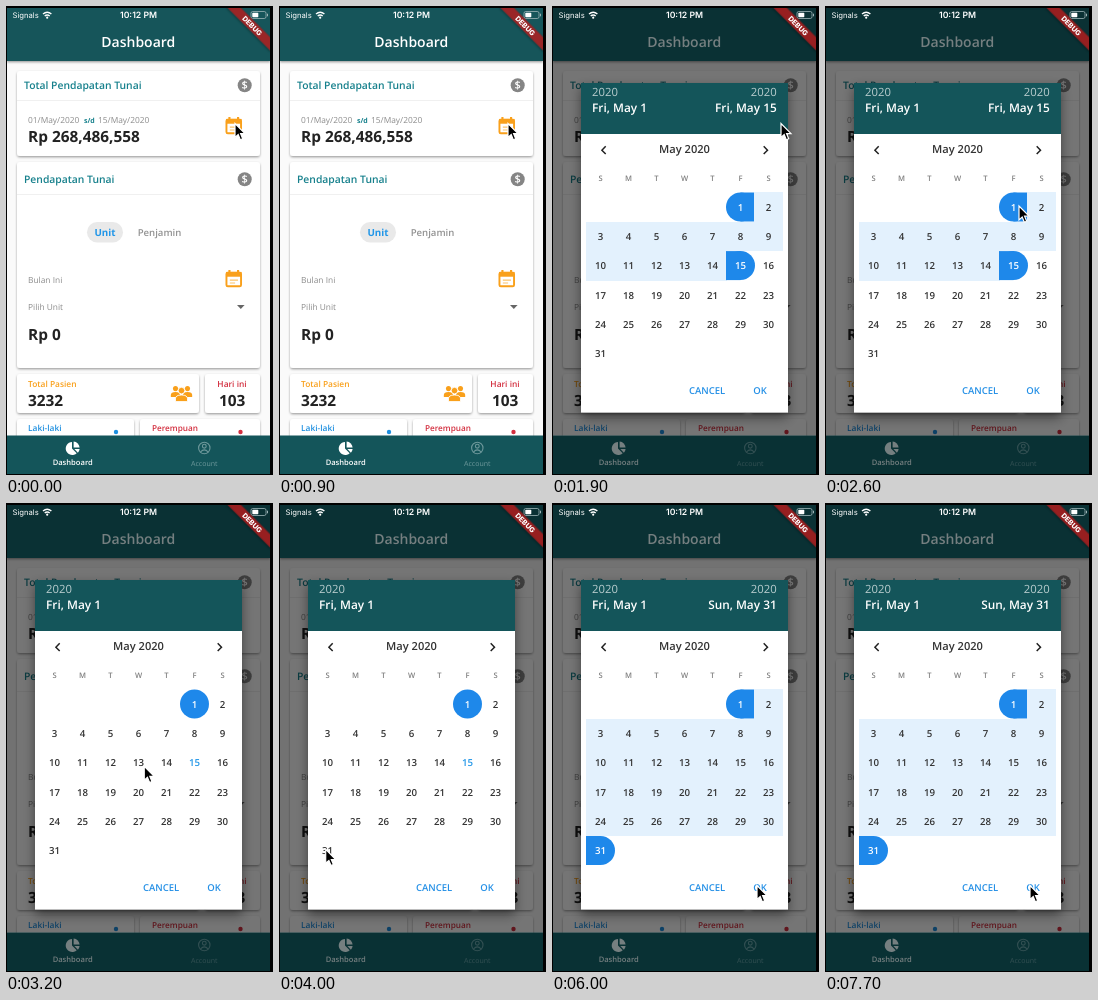
These frames come from a looping animation (267 px wide and 469 px high, 8 s). An HTML page:

```html
<!DOCTYPE html>
<html lang="id">
<head>
<meta charset="utf-8">
<title>Dashboard</title>
<style>
  html, body { margin: 0; width: 100%; height: 100%; overflow: hidden; background: #000; }
  svg { display: block; width: 100%; height: 100%; }
  text { font-family: "Open Sans", "Noto Sans", sans-serif; text-rendering: geometricPrecision; }
  .sys { font-family: Inter, Roboto, sans-serif; }
</style>
</head>
<body>
<svg id="stage" viewBox="0 0 267 469"></svg>
<script>
const LOOP = 8000, STEP = 100;
const TEAL = '#14555a', BLUE = '#1e88ea', ORANGE = '#f9a01b', RED = '#d32f3f';
const GRAY = '#8c8c8c', INK = '#222';

const text = (x, y, str, size, fill, weight = 400, anchor = 'start', extra = '') =>
  `<text x="${x}" y="${y}" font-size="${size}" fill="${fill}" font-weight="${weight}" text-anchor="${anchor}" ${extra}>${str}</text>`;
const rect = (x, y, w, h, fill, extra = '') =>
  `<rect x="${x}" y="${y}" width="${w}" height="${h}" fill="${fill}" ${extra}/>`;
const circle = (x, y, r, fill, extra = '') =>
  `<circle cx="${x}" cy="${y}" r="${r}" fill="${fill}" ${extra}/>`;
const path = (d, fill, extra = '') => `<path d="${d}" fill="${fill}" ${extra}/>`;
const line = (d, color, width) => path(d, 'none', `stroke="${color}" stroke-width="${width}"`);
const group = (attrs, ...parts) => `<g ${attrs}>${parts.join('')}</g>`;

const card = (x, y, w, h) => rect(x, y, w, h, '#fff', 'rx="3" filter="url(#soft)"');
const amount = (x, y, str) => text(x, y, str, 15.4, INK, 700);
const cardTitle = (y, str) =>
  text(18, y, str, 10.35, '#16808c', 600) + line(`M11 ${y + 11.5}H254`, '#f0f0f0', 1);
const coin = y => circle(238.7, y, 7, '#858585') + text(238.7, y + 4, '$', 11, '#fff', 600, 'middle');

const calendarIcon = y => group(`transform="translate(219.5 ${y}) scale(.96)"`,
  rect(1, 2.7, 15.2, 14.3, 'none', `rx="1.5" stroke="${ORANGE}" stroke-width="2"`),
  rect(0.5, 2, 16.2, 5, ORANGE),
  rect(3, 0, 2.2, 4, ORANGE), rect(12, 0, 2.2, 4, ORANGE),
  line('M4.5 10.5H13M4.5 13.5H10', '#fbc46b', 1.2));

const person = (x, y, s) => group(`transform="translate(${x} ${y}) scale(${s})"`,
  circle(0, -4, 3, ORANGE), path('M-5.5 6V3.5Q-5.5 0 0 0T5.5 3.5V6Z', ORANGE));
const people = person(169.5, 386, 0.85) + person(181.5, 386, 0.85) +
  group('stroke="#fff" stroke-width=".8"', person(175.5, 389, 1.1));

function dashboard() {
  return [
    rect(1, 2, 263, 466, '#fafafa'),
    card(11, 65, 243, 85), cardTitle(83, 'Total Pendapatan Tunai'), coin(79.3),
    text(22, 117, '01/May/2020', 8.4, GRAY),
    text(78, 116.5, 's/d', 7, '#16808c', 700),
    text(92, 117, '15/May/2020', 8.4, GRAY),
    amount(22, 136, 'Rp 268,486,558'), calendarIcon(111),

    card(11, 156, 243, 206), cardTitle(177, 'Pendapatan Tunai'), coin(173.3),
    rect(81, 216, 36, 20.5, '#e9e9e9', 'rx="10.2"'),
    text(99, 229.5, 'Unit', 9.8, '#2196e8', 700, 'middle'),
    text(153.5, 229.5, 'Penjamin', 9.6, '#929292', 600, 'middle'),
    text(22, 277, 'Bulan Ini', 8.4, GRAY), calendarIcon(264),
    text(22, 304, 'Pilih Unit', 8.4, GRAY),
    path('M231 299H238.6L234.8 303Z', '#666'),
    amount(22, 334, 'Rp 0'),

    card(11, 368, 182, 39), text(22, 381, 'Total Pasien', 8.4, ORANGE, 600),
    amount(22, 400, '3232'), people,
    card(199, 368, 55, 39), text(226, 381, 'Hari ini', 8.4, RED, 600, 'middle'),
    amount(213, 400, '103'),
    card(11, 413, 117, 39), text(22, 425, 'Laki-laki', 8.4, '#1d8fe0', 600), circle(110, 426, 2.2, '#1d8fe0'),
    card(134, 413, 120, 39), text(146, 425, 'Perempuan', 8.2, RED, 600), circle(234.5, 426, 2.2, RED),

    rect(1, 2, 263, 53, TEAL, 'filter="url(#soft)"'),
    text(132.3, 41, 'Dashboard', 14, '#fff', 600, 'middle'),
    rect(1, 429.5, 263, 38.5, TEAL),
    path('M66 436V442.5L70.7 447.2A6.5 6.5 0 1 1 66 436Z', '#fff'),
    path('M67.6 435.6A6.3 6.3 0 0 1 73.6 441.6H67.6Z', '#fff'),
    path('M68.4 443.1H73.6A6.3 6.3 0 0 1 71.9 446.7Z', '#fff'),
    text(66.7, 459, 'Dashboard', 7.6, '#fff', 600, 'middle'),
    circle(198.3, 442, 5.7, 'none', 'stroke="#6f999c" stroke-width="1.1"'),
    circle(198.3, 440.2, 1.9, 'none', 'stroke="#6f999c" stroke-width="1.1"'),
    line('M194.5 446Q198.3 441.8 202.1 446', '#6f999c', 1.1),
    text(198.3, 459.5, 'Account', 7, '#6f999c', 400, 'middle')
  ].join('');
}

const CELL_W = 28, CELL_H = 29.3, R = 14.5, FIRST_X = 48.5;
const cellCenter = day => {
  const i = day + 4;
  return [FIRST_X + CELL_W * (i % 7), 201 + CELL_H * Math.floor(i / 7)];
};

// Month grid with 1 May selected, optionally up to the given last day.
function month(last) {
  let marks = '', labels = '';
  for (let day = 1; day <= 31; day++) {
    const [x, y] = cellCenter(day);
    const isEnd = day === 1 || day === last;
    if (day > 1 && day < last)
      marks += rect(x - R, y - CELL_H / 2, 2 * R, CELL_H + 0.4, '#e3f1fd', 'shape-rendering="crispEdges"');
    if (isEnd) {
      marks += circle(x, y, R, BLUE);
      if (last) marks += rect(day === 1 ? x : x - R, y - R, R, 2 * R, BLUE);
    }
    const today = day === 15 && !last;
    labels += text(x, y + 3.6, day, 9.7, isEnd ? '#fff' : today ? '#2196e8' : '#333', 600, 'middle');
  }
  return marks + labels;
}

function selection(id, last, lastLabel) {
  const column = (x, label, anchor) =>
    text(x, 89.8, '2020', 11.3, '#b9cdce', 400, anchor) + text(x, 105.6, label, 11.85, '#fff', 600, anchor);
  return group(`id="${id}"`,
    column(40, 'Fri, May 1', 'start'),
    last ? column(224.7, lastLabel, 'end') : '',
    month(last));
}

function dialog() {
  const weekdays = [...'SMTWTFS'].map((c, i) =>
    text(FIRST_X + CELL_W * i, 175, c, 7.6, '#808080', 600, 'middle'));
  const dim = (y, h, color) => rect(1, y, 263, h, color, 'opacity=".54"');
  return group('id="dialog"',
    dim(2, 53, '#001415'), dim(55, 374.5, '#000'), dim(429.5, 38.5, '#001415'),
    rect(29, 77, 207, 329.5, '#fff', 'filter="url(#deep)"'),
    rect(29, 77, 207, 51, TEAL),
    line('M53.7 140.3L49.9 144.2L53.7 148.1M211.7 140.3L215.5 144.2L211.7 148.1', '#222', 1.5),
    text(132.5, 146.5, 'May 2020', 11.1, '#333', 600, 'middle'),
    ...weekdays,
    selection('toMid', 15, 'Fri, May 15'), selection('single'), selection('toEnd', 31, 'Sun, May 31'),
    text(155, 388, 'CANCEL', 9.5, '#2590e6', 600, 'middle'),
    text(208, 388, 'OK', 9.5, '#2590e6', 600, 'middle'));
}

function statusBar() {
  return [
    text(6.5, 12, 'Signals', 7.7, '#fff', 400, 'start', 'class="sys"'),
    line('M37 8Q41.2 4.4 45.4 8M38.7 10Q41.2 7.9 43.7 10', '#fff', 1.4), circle(41.2, 11.7, 1.1, '#fff'),
    text(132.5, 12.2, '10:12 PM', 8.7, '#fff', 600, 'middle', 'class="sys"'),
    rect(245, 5.5, 15, 7, 'none', 'rx="1.7" stroke="#9db4b6" stroke-width=".8"'),
    rect(246.3, 6.8, 6, 4.4, '#fff', 'rx=".7"'), rect(261, 7.7, 1, 2.6, '#9db4b6'),
    group('clip-path="url(#screen)"', group('transform="translate(264 2) rotate(45)"',
      rect(-31, 20.5, 62, 9.3, '#b71c1c', 'opacity=".82" filter="url(#soft)"'),
      text(0, 27.8, 'DEBUG', 7.1, '#fff', 800, 'middle', 'class="sys"')))
  ].join('');
}

const stage = document.getElementById('stage');
stage.innerHTML = `<defs>
    <filter id="soft" x="-10%" y="-20%" width="120%" height="150%"><feDropShadow dx="0" dy="1.2" stdDeviation="1.3" flood-opacity=".38"/></filter>
    <filter id="deep" x="-15%" y="-15%" width="130%" height="130%"><feDropShadow dx="0" dy="5" stdDeviation="6" flood-opacity=".45"/></filter>
    <clipPath id="screen"><rect x="1" y="2" width="263" height="466"/></clipPath>
  </defs>` +
  rect(0, 0, 267, 469, '#000') +
  group('clip-path="url(#screen)"', dashboard(), dialog()) + statusBar() +
  group('id="cursor"',
    circle(0, 0, 14.5, '#888', 'id="press" opacity=".16"'),
    path('M0 0V14L3.2 11.1L5.3 16.2L7.7 15.2L5.6 10.2H10Z', '#000', 'stroke="#fff" stroke-width="1.2"'));

const part = Object.fromEntries(['dialog', 'toMid', 'single', 'toEnd', 'cursor', 'press']
  .map(id => [id, document.getElementById(id)]));
const show = (el, on) => el.setAttribute('display', on ? 'inline' : 'none');

// Each move runs from one point to the next along a quadratic curve.
const MOVES = [
  { from: 2300, to: 2600, a: [229, 117.5], c: [218, 160], b: [194, 200] },
  { from: 2900, to: 3600, a: [194, 200], c: [125, 285], b: [46.7, 346.3] },
  { from: 4900, to: 5900, a: [46.7, 346.3], c: [125, 216], b: [205, 382.5] }
];

function cursorAt(t) {
  const move = MOVES.findLast(m => t >= m.from) || MOVES[0];
  const p = Math.min(1, Math.max(0, (t - move.from) / (move.to - move.from)));
  const k = p * p * (3 - 2 * p);
  return [0, 1].map(i => (1 - k) ** 2 * move.a[i] + 2 * k * (1 - k) * move.c[i] + k * k * move.b[i]);
}

function draw(time) {
  const t = Math.floor((time % LOOP) / STEP) * STEP;
  const within = (from, to) => t >= from && t < to;
  show(part.dialog, t >= 1100);
  show(part.toMid, t < 2900);
  show(part.single, within(2900, 4500));
  show(part.toEnd, t >= 4500);
  show(part.press, within(3800, 4000) || within(6200, 6400));
  part.cursor.setAttribute('transform', `translate(${cursorAt(t)})`);
}

const start = performance.now();
(function tick() {
  draw(performance.now() - start);
  requestAnimationFrame(tick);
})();
</script>
</body>
</html>
```
